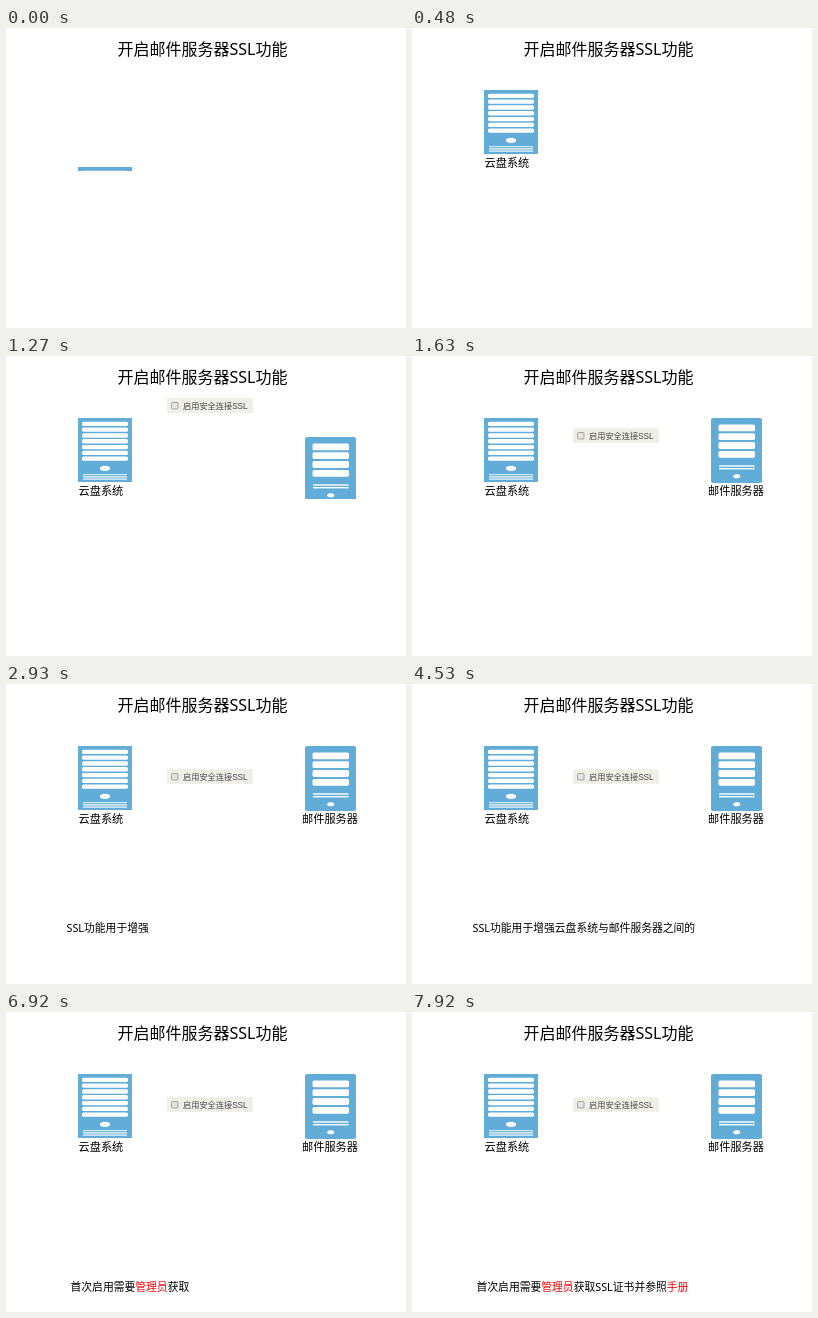
These frames come from a looping animation (400 by 300 pixels, 8 s). An HTML page:

```html
<!DOCTYPE html>
<html lang="zh-CN">
<head>
<meta charset="utf-8">
<title>SSL</title>
<style>
  html, body { margin: 0; width: 100%; height: 100%; overflow: hidden; background: #fff; }
  svg { display: block; width: 400px; height: 300px; }
  text { font-family: "Noto Sans", "Noto Sans CJK SC", "Noto Sans CJK", sans-serif; white-space: pre; }
  .title { font-size: 16px; }
  .label { font-size: 11.2px; }
  .line { font-size: 10.8px; }
  .option { font: 8.2px "Liberation Sans", "Noto Sans CJK SC", "Noto Sans CJK", sans-serif; fill: #484848; }
  .red { fill: #f00; }
  .body { fill: #62acd8; }
  .slot { fill: #fff; }
  .vent { fill: #d3e8f4; }

  /* A tiny lead keeps steps on their 10 ms marks. */
  .cloud, .mail, .check, .line { animation: 8s -4ms infinite step-end; }
  .cloud { animation-name: cloud; }
  .mail { animation-name: mail; }
  .check { animation-name: check; }
  #purpose { animation-name: purpose; }
  #hint { animation-name: hint; }
  .word { fill-opacity: 0; animation: word 8s infinite step-end; }

  @keyframes cloud {
    0% { transform: translateY(77px); animation-timing-function: steps(8, end); }
    6%, 100% { transform: none; }
  }
  @keyframes mail {
    0% { transform: translateY(90px); }
    11.375% { transform: translateY(76px); animation-timing-function: steps(8, end); }
    17.375%, 100% { transform: translateY(0); }
  }
  @keyframes check {
    0% { transform: translateY(-110px); }
    7.625% { transform: translateY(-98px); animation-timing-function: steps(19, end); }
    21.875% { transform: translateY(-3px); }
    22.625%, 100% { transform: translateY(0); }
  }
  @keyframes purpose {
    0% { opacity: 0; }
    29% { opacity: 1; }
    75.75%, 100% { opacity: 0; }
  }
  @keyframes hint {
    0% { opacity: 0; }
    75.75%, 100% { opacity: 1; }
  }
  @keyframes word {
    0% { fill-opacity: 1; }
    50%, 100% { fill-opacity: 0; }
  }
</style>
</head>
<body>
<svg viewBox="0 0 400 300">
  <clipPath id="floor"><rect width="400" height="143"/></clipPath>
  <text class="title" x="111.5" y="27">开启邮件服务器SSL功能</text>

  <g clip-path="url(#floor)">
    <g class="cloud">
      <rect class="body" x="72" y="62" width="54" height="64"/>
      <g id="cloudSlots" class="slot"></g>
      <ellipse class="slot" cx="99" cy="112.3" rx="5" ry="2.6"/>
      <g class="vent">
        <rect x="77" y="118" width="44" height="1.2"/>
        <rect x="77" y="120" width="44" height="1.6"/>
        <rect x="77" y="122.3" width="44" height="1.6"/>
      </g>
      <text class="label" x="72.5" y="139">云盘系统</text>
    </g>
    <g class="mail">
      <rect class="body" x="299" y="62" width="51" height="65" rx="2"/>
      <g id="mailSlots" class="slot"></g>
      <rect class="slot" x="307" y="109.3" width="35.5" height="1.4"/>
      <rect class="slot" x="307" y="112" width="35.5" height="1.4"/>
      <ellipse class="slot" cx="324.7" cy="120.2" rx="3.5" ry="2"/>
      <text class="label" x="296" y="139">邮件服务器</text>
    </g>
  </g>

  <g class="check">
    <rect x="161" y="85" width="86" height="15" fill="#f0efe8"/>
    <rect x="165.5" y="89.5" width="6.5" height="6.5" rx="1" fill="#e4e4e2" stroke="#a3a3a0"/>
    <text class="option" x="177" y="95.7">启用安全连接SSL</text>
  </g>

  <text id="purpose" class="line" x="60.5" y="248"></text>
  <text id="hint" class="line" x="64.5" y="279"></text>
</svg>
<script>
  const byId = id => document.getElementById(id);

  function addSlots(id, count, x, y, width, height, pitch) {
    byId(id).innerHTML = Array.from({ length: count }, (_, i) =>
      `<rect x="${x}" y="${y + i * pitch}" width="${width}" height="${height}" rx="1.6"/>`).join('');
  }

  // The first word appears at `first`, each later one at base + 200 * index.
  function addWords(id, first, base, words) {
    const red = ['管理员', '手册'];
    byId(id).innerHTML = words.split('|').map((word, i) => {
      const delay = (i ? base + 200 * i : first) - 4;
      const tone = red.includes(word) ? ' red' : '';
      return `<tspan class="word${tone}" style="animation-delay:${delay}ms">${word}</tspan>`;
    }).join('');
  }

  addSlots('cloudSlots', 7, 76, 65.8, 46, 4.3, 5.77);
  addSlots('mailSlots', 4, 306.5, 68.5, 36.5, 6.8, 8.8);
  addWords('purpose', 2340, 2330, 'SSL|功能|用于|增强|云|盘|系统|与|邮件|服务器|之间|的|数据|安全性|。');
  addWords('hint', 6060, 6120, '首次|启用|需要|管理员|获取|SSL|证书|并|参照|手册');
</script>
</body>
</html>
```
